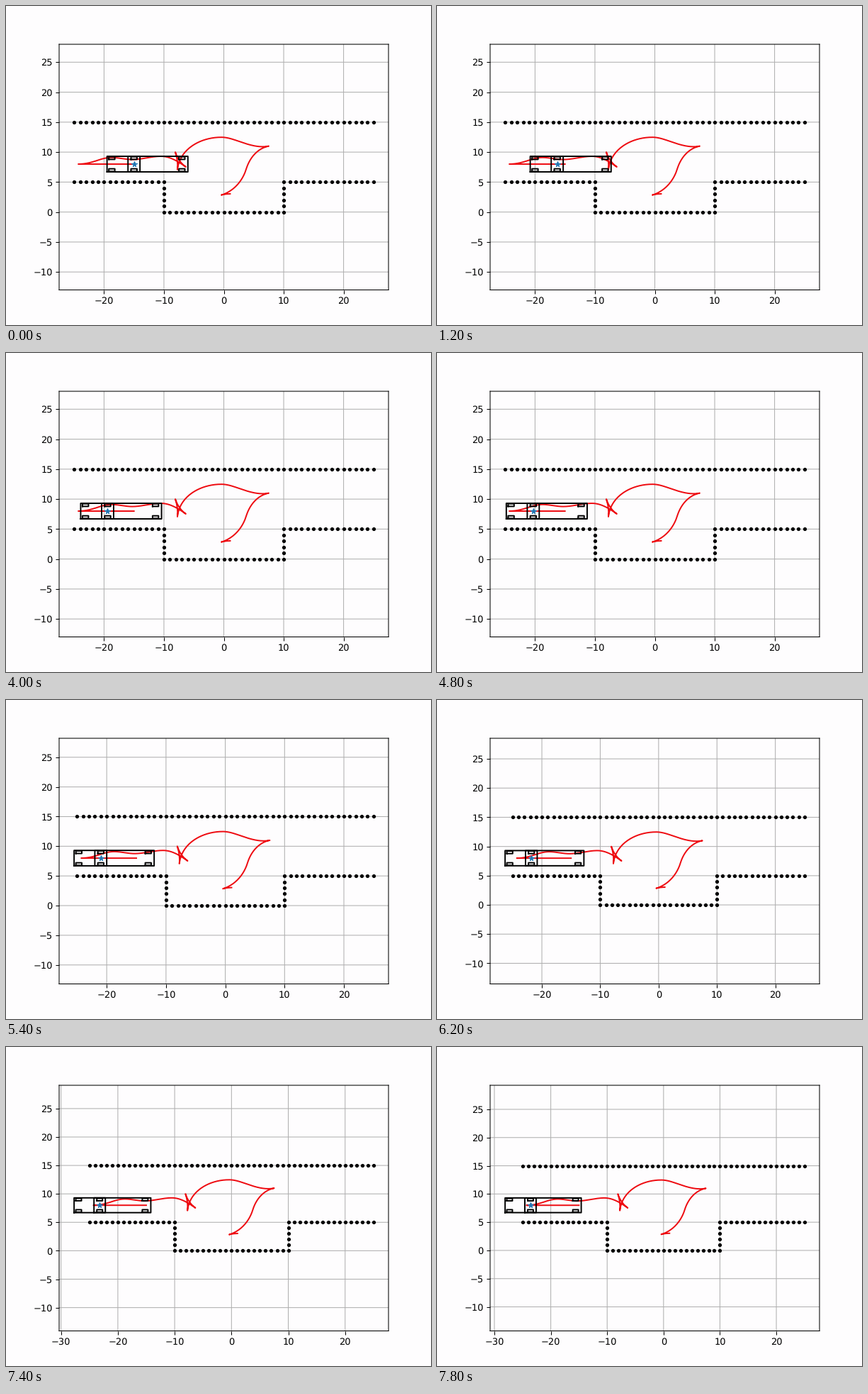
A matplotlib script for the animation above (8 s loop, 600 by 450 pixels).

```python
import numpy as np
import matplotlib.pyplot as plt
from matplotlib.animation import FuncAnimation

plt.rcParams["path.snap"] = False
plt.rcParams["text.hinting"] = "none"

FRAMES, INTERVAL = 40, 200
SIM_MS, STEP = 90, 0.1           # one simulation step: duration, distance
START = (-15, 8, 180)            # x, y, heading in degrees
AREA_X, AREA_Y = 25, 15
BAY_X, BAY_Y = 10, 5

# truck and trailer dimensions, measured from the hitch point
WIDTH, WHEEL_BASE = 2.6, 3.7
FRONT, BACK = 4.5, 1.0
TRAILER_FRONT, TRAILER_BACK, TRAILER_AXLE = 1.0, 9.0, 8.0
WHEEL_R, WHEEL_OFFSET = 0.5, 1.0

# poses reached on each leg; the truck changes gear between legs
LEGS = [
    [(-24.3, 8, 180)],
    [(-21.2, 8.59, 199), (-18.75, 9.1, 180), (-15.3, 8.76, 180),
     (-10.5, 9.3, 180), (-6.35, 7.54, 145)],
    [(-8.1, 10, 108)],
    [(-7.75, 7.06, 84)],
    [(-0.41, 12.48, 0), (3, 11.63, -18.5), (7.5, 11, 11)],
    [(3.75, 7.2, 73), (-0.41, 2.84, 17)],
    [(1.06, 3.04, 2)],
]


def bend(start, end, gear, n=40):
    """Near-circular curve between two poses, driven in the given gear."""
    p, q = np.array(start[:2]), np.array(end[:2])
    a, b = np.radians(start[2]), np.radians(end[2])
    reach = gear * np.hypot(*(q - p)) / np.cos((b - a) / 4) ** 2
    u = reach * np.array([np.cos(a), np.sin(a)])
    v = reach * np.array([np.cos(b), np.sin(b)])
    t = np.linspace(0, 1, n)[:, None]
    s = 1 - t
    return p * s * s * (1 + 2 * t) + q * t * t * (3 - 2 * t) \
        + u * t * s * s - v * t * t * s


def route():
    pose, gear, curves = START, 1, []
    for leg in LEGS:
        for target in leg:
            curves.append(bend(pose, target, gear))
            pose = target
        gear = -gear
    return np.vstack(curves)


def walls():
    dots = [(x, AREA_Y) for x in range(-AREA_X, AREA_X + 1)]
    dots += [(x, 0) for x in range(-BAY_X, BAY_X + 1)]
    for side in (-1, 1):
        dots += [(side * x, BAY_Y) for x in range(BAY_X, AREA_X + 1)]
        dots += [(side * BAY_X, y) for y in range(1, BAY_Y)]
    return np.array(dots)


def box(x0, x1, y0, y1):
    return np.array([(x0, y0), (x1, y0), (x1, y1), (x0, y1), (x0, y0)])


def vehicle_parts():
    """Outlines around the hitch point, truck facing left."""
    half, tread = WIDTH / 2, WIDTH / 12
    parts = [box(-FRONT, BACK, -half, half),
             box(-TRAILER_FRONT, TRAILER_BACK, -half, half)]
    for axle in (-WHEEL_BASE, 0, TRAILER_AXLE):
        for y in (-WHEEL_OFFSET, WHEEL_OFFSET):
            parts.append(box(axle - WHEEL_R, axle + WHEEL_R,
                             y - tread, y + tread))
    return parts


fig, ax = plt.subplots(figsize=(6.4, 4.8), dpi=93.75)
fig.set_facecolor("#fefdfe")
ax.set_facecolor("#fefdfe")
fig.subplots_adjust(left=0.125, right=0.9, bottom=0.11, top=0.88)
ax.grid(True)

ax.plot(*route().T, color="#ee0a10")
ax.plot(*walls().T, ".k")
parts = vehicle_parts()
outlines = [ax.plot([], [], "-k")[0] for _ in parts]
hitch, = ax.plot([], [], "*", color="C0")


def fit_view(left):
    """Equal scale on both axes, 5% margin around the x extent."""
    pad = 0.05 * (AREA_X - left)
    ax.set_xlim(left - pad, AREA_X + pad)
    size = ax.get_window_extent()
    half = (AREA_X - left + 2 * pad) / 2 * size.height / size.width
    ax.set_ylim(AREA_Y / 2 - half, AREA_Y / 2 + half)


def draw(i):
    x, y = START[0] - STEP * (i * INTERVAL // SIM_MS), START[1]
    for line, part in zip(outlines, parts):
        line.set_data(*(part + (x, y)).T)
    hitch.set_data([x], [y])
    fit_view(min(-AREA_X, x - FRONT))
    return outlines + [hitch]


anim = FuncAnimation(fig, draw, frames=FRAMES, init_func=lambda: draw(0),
                     interval=INTERVAL, repeat=True, repeat_delay=0,
                     blit=False)
plt.show()
```
